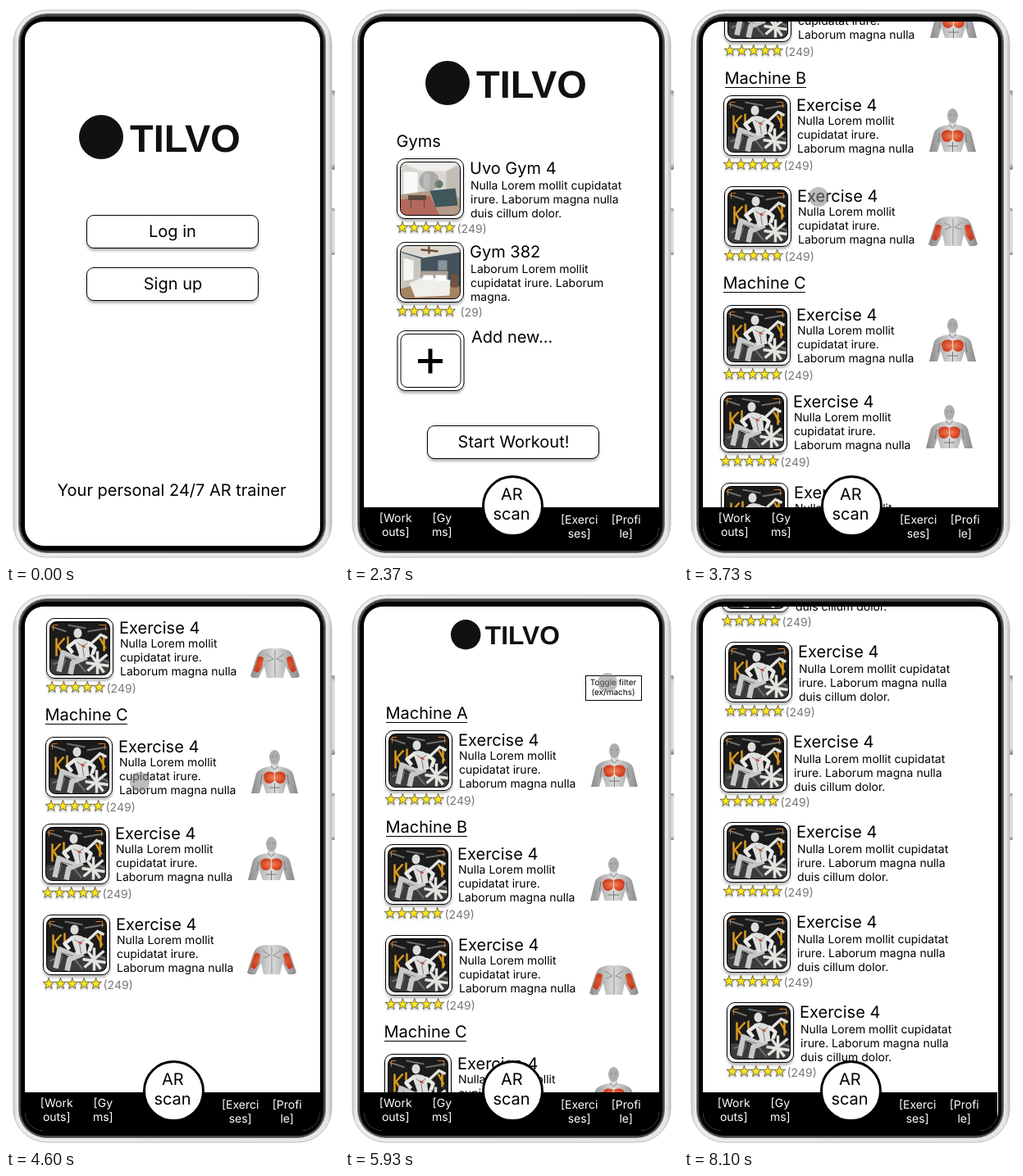
An HTML page that plays this animation: 406x680 px, repeating every 8.63 s.

```html
<!DOCTYPE html>
<html lang="en">
<head>
<meta charset="utf-8">
<title>Fitness app walkthrough</title>
<style>
  html, body { margin: 0; width: 100%; height: 100%; overflow: hidden; background: #fff; }
  svg { display: block; }
  text { font-family: Inter, "Open Sans", sans-serif; text-rendering: geometricPrecision; }
  .lg { font-size: 20px; }
  .md { font-size: 14px; }
  .sm { font-size: 10px; }
  .mid { text-anchor: middle; }
  .brand { font: bold 47px "Liberation Sans", Arial, sans-serif; }
  .box { fill: #fff; stroke: #000; }
  .shade { filter: drop-shadow(0 3px 1.5px rgba(0, 0, 0, .28)); }
  .stars { fill: #ffe81a; stroke: #222; stroke-width: .6; filter: drop-shadow(0 2px 1px rgba(0, 0, 0, .25)); }
</style>
</head>
<body>
<svg id="stage" width="406" height="680" viewBox="0 0 406 680">
  <defs>
    <clipPath id="screenClip"><rect x="23" y="19" width="360" height="640" rx="23"/></clipPath>
    <clipPath id="photoClip"><rect width="73" height="65" rx="8"/></clipPath>
    <linearGradient id="body" x2="1">
      <stop offset="0" stop-color="#c9c9c9"/><stop offset=".012" stop-color="#ececec"/>
      <stop offset=".988" stop-color="#e6e6e6"/><stop offset="1" stop-color="#bdbdbd"/>
    </linearGradient>
    <linearGradient id="key" x2="0" y2="1">
      <stop offset="0" stop-color="#8a8a8a"/><stop offset=".08" stop-color="#dedede"/>
      <stop offset=".92" stop-color="#dedede"/><stop offset="1" stop-color="#777"/>
    </linearGradient>
    <linearGradient id="skin" x2="1">
      <stop offset="0" stop-color="#8a8a8a"/><stop offset=".5" stop-color="#dcdcdc"/><stop offset="1" stop-color="#8a8a8a"/>
    </linearGradient>
    <radialGradient id="flesh">
      <stop offset="0" stop-color="#f58a5c"/><stop offset="1" stop-color="#cf3d1e"/>
    </radialGradient>

    <g id="machine">
      <rect width="73" height="65" fill="#1b1b1c"/>
      <path d="M0 46H73V65H0Z" fill="#3d3c3c"/>
      <path d="M2 6L20 12M22 4L44 8M46 12L70 8M4 52L14 48M34 50L44 62M64 46L72 50" stroke="#6d6d6b" stroke-width="2"/>
      <path d="M8 20V42M9 30L18 20M10 30L17 41M22 18V30M61 20L68 33M66 16V36" stroke="#d99a1c" stroke-width="2.5" fill="none"/>
      <path d="M60 4H68V11M4 11V4H10" stroke="#d9791c" fill="none"/>
      <path d="M46 60L70 40M50 40L66 62M58 36V64M44 50L72 54M47 30L62 16L70 20" stroke="#e2e2de" stroke-width="3.5" fill="none"/>
      <path d="M42 40L34 46L16 38L11 61M45 43L28 50L25 64" stroke="#c6c8c7" stroke-width="6.5" fill="none" stroke-linejoin="round"/>
      <path d="M29 22Q38 18 47 24L49 43L37 45Z" fill="#dededd"/>
      <path d="M31 24L22 31L28 38M46 25L55 32L52 40" stroke="#e9e9e8" stroke-width="4.5" fill="none" stroke-linejoin="round"/>
      <path d="M34 26L40 30L46 26M40 30L42 43M18 42L32 46M20 44L15 58" stroke="#777" fill="none"/>
      <ellipse cx="34" cy="14" rx="5" ry="6" fill="#dcdcda"/>
      <path d="M39 29L43 31" stroke="#d0483a" stroke-width="2"/>
    </g>
    <g id="lounge">
      <rect width="73" height="65" fill="#d9d6d1"/>
      <path d="M0 0H73L56 11H24Z" fill="#efeeeb"/>
      <path d="M4 12H21V39H4ZM28 14H36V33H28Z" fill="#f8faf9"/>
      <path d="M56 11L73 4V46L56 36Z" fill="#c2bdb5"/>
      <path d="M0 40L35 35L73 44V65H0Z" fill="#b39c88"/>
      <path d="M0 46L36 41L48 65H0Z" fill="#b3685c"/>
      <path d="M36 35L67 32L70 53L43 55Z" fill="#3f565b"/>
      <path d="M10 41H31V46H10ZM13 46V56M29 46V55" fill="#5c4941" stroke="#5c4941"/>
      <circle cx="47" cy="27" r="5" fill="#667b63"/>
    </g>
    <g id="bedroom">
      <rect width="73" height="65" fill="#43525d"/>
      <path d="M0 0H73V8L28 15L0 7Z" fill="#ddd9d1"/>
      <path d="M0 8L25 16V47L0 55Z" fill="#c8c6bf"/>
      <path d="M4 15L16 18V41L4 43Z" fill="#f6f6f1"/>
      <path d="M25 5L46 7M35 1V10" stroke="#704b3b" stroke-width="2.5"/>
      <path d="M46 18H57V30H46Z" fill="#8b9698"/>
      <path d="M0 53L24 46L73 50V65H0Z" fill="#a38262"/>
      <path d="M25 31H58V44H25Z" fill="#aaa296"/>
      <path d="M11 46L29 38L61 42L60 61L18 63Z" fill="#f0eeea"/>
      <path d="M28 36H40V42H28ZM43 36H56V43H43Z" fill="#fff"/>
      <path d="M62 35H70V51H62Z" fill="#765340"/>
    </g>

    <g id="chest">
      <path d="M24 13V20Q9 22 6 29L0 53H10L14 40L18 53H39L43 40L47 53H57L51 29Q48 22 33 20V13Z" fill="url(#skin)"/>
      <ellipse cx="28.5" cy="9" rx="6.5" ry="9" fill="#adadad"/>
      <path d="M25 8H27M30 8H32M24 20L28.5 24L33 20M28.5 41V53M22 46H35M13 30L11 42M44 30L46 42" stroke="#777" fill="none"/>
      <path d="M28 28Q19 24 15 31Q15 41 22 41Q27 40 28 37ZM29 28Q38 24 42 31Q42 41 35 41Q30 40 29 37Z" fill="url(#flesh)"/>
    </g>
    <g id="triceps">
      <path d="M23 1H37Q49 2 52 10L60 35L57 37H50L43 23L40 37H20L17 23L10 37H3L0 35L8 10Q11 2 23 1Z" fill="url(#skin)"/>
      <path d="M9 12Q12 9 16 13L14 24L9 31L4 28ZM51 12Q48 9 44 13L46 24L51 31L56 28Z" fill="url(#flesh)"/>
      <path d="M30 3V36M19 8L28 14L20 17M41 8L32 14L40 17" stroke="#8b8b8b" fill="none"/>
    </g>
  </defs>

  <rect width="406" height="680" fill="#fff"/>
  <rect x="396" y="103" width="5" height="97" rx="2" fill="url(#key)"/>
  <rect x="396" y="247" width="5" height="57" rx="2" fill="url(#key)"/>
  <rect x="9" y="5" width="388" height="668" rx="41" fill="url(#body)" stroke="#bcbcbc"/>
  <rect x="15" y="9" width="375" height="659" rx="35" fill="#777"/>
  <rect x="16" y="10" width="373" height="657" rx="34" fill="#444"/>
  <rect x="18" y="13" width="369" height="652" rx="31" fill="#000"/>
  <g clip-path="url(#screenClip)">
    <rect x="23" y="19" width="360" height="640" fill="#fff"/>
    <g id="login"></g>
    <g id="home"></g>
    <g id="machines"></g>
    <g id="muscles"></g>
    <g id="nav"></g>
  </g>
  <circle id="cursor" r="12" fill="#858585" fill-opacity=".55"/>
</svg>
<script>
const el = id => document.getElementById(id);
const text = (x, y, s, cls = 'lg', extra = '') => `<text x="${x}" y="${y}" class="${cls}" ${extra}>${s}</text>`;
const mid = (x, y, s, cls = 'lg', extra = '') => text(x, y, s, cls + ' mid', extra);
const lines = (x, y, list) => list.map((s, i) => text(x, y + 17 * i, s, 'md')).join('');
const heading = (x, y, s, width = 99) => text(x - .5, y + 7, s) +
  `<path d="M${x} ${y + 11.5}h${width}" stroke="#000"/>`;
const image = (id, x, y) => `<use href="#${id}" x="${x}" y="${y}"/>`;

const starPath = Array.from({ length: 10 }, (_, i) => {
  const r = i % 2 ? 2.8 : 7.3, a = i * Math.PI / 5;
  return (r * Math.sin(a)).toFixed(2) + ' ' + (-r * Math.cos(a)).toFixed(2);
}).join('L');

const logo = (x, y, k = 1) => `<g transform="translate(${x} ${y}) scale(${k})">
  <circle cx="27" cy="33" r="27" fill="#111"/>
  <text x="62" y="51" class="brand" fill="#111">TILVO</text></g>`;

const button = (x, y, s, tx) =>
  `<rect x="${x + .5}" y="${y + .5}" width="209" height="40" rx="8.5" class="box shade"/>` + mid(tx, y + 27, s);

const thumb = (x, y, photo) => `<g transform="translate(${x} ${y})">
  <rect x=".5" y=".5" width="81" height="73" rx="9.5" class="box shade"/>
  ${photo ? `<g transform="translate(4.5 4.5)" clip-path="url(#photoClip)"><use href="#${photo}"/></g>` : ''}
  <rect x="4.5" y="4.5" width="73" height="65" rx="8" fill="none" stroke="#000"/></g>`;

const stars = (x, y) => '<g class="stars">' + [0, 1, 2, 3, 4].map(i =>
  `<path d="M${starPath}Z" transform="translate(${x + 7 + 14.4 * i} ${y})"/>`).join('') + '</g>';

// y is the middle of the title line
function card(x, y, title, body, photo, gap = 26, count = '(249)', countX = 73.5) {
  return thumb(x, y - 12, photo) + text(x + 89, y + 7, title) + lines(x + 90, y + gap, body) +
    stars(x, y + 72.5) + text(x + countX, y + 79, count, 'md', 'fill="#777"');
}

const longBody = ['Nulla Lorem mollit cupidatat', 'irure. Laborum magna nulla', 'duis cillum dolor.'];
const shortBody = ['Nulla Lorem mollit', 'cupidatat irure.', 'Laborum magna nulla'];

const byMachine = (x, y, part) => card(x, y, 'Exercise 4', shortBody, 'machine', 24) +
  (part === 'chest' ? image(part, x + 251, y + 4) : image(part, x + 249, y + 24));
const byMuscle = (x, y) => card(x, y, 'Exercise 4', longBody, 'machine');

const listTop = logo(129, 31, .675) +
  '<rect x="293.5" y="103.5" width="68" height="30" class="box"/>' +
  mid(327, 115, 'Toggle filter', 'sm') + mid(327, 127, '(ex/machs)', 'sm');

el('login').innerHTML = logo(89, 127) + button(98, 255, 'Log in', 203) +
  button(98, 319, 'Sign up', 203.5) + mid(202, 598, 'Your personal 24/7 AR trainer');

el('home').innerHTML = logo(98, 61) + text(62.5, 172, 'Gyms') +
  card(63, 198, 'Uvo Gym 4', longBody, 'lounge') +
  card(63, 300, 'Gym 382', ['Laborum Lorem mollit', 'cupidatat irure. Laborum', 'magna.'], 'bedroom', 26, '(29)', 77.5) +
  thumb(63.5, 396) + '<path d="M89 433.5H119M104 418.5V448.5" stroke="#000" stroke-width="5"/>' +
  text(154, 411, 'Add new...') + button(100, 512, 'Start Workout!', 205.5);

el('machines').innerHTML = listTop +
  heading(50, 149, 'Machine A') + byMachine(49, 182, 'chest') +
  heading(50, 288, 'Machine B') + byMachine(48, 321, 'chest') + byMachine(49, 432, 'triceps') +
  heading(48, 538, 'Machine C', 100) + byMachine(48, 577, 'chest') +
  byMachine(44, 683, 'chest') + byMachine(45, 794, 'triceps');

el('muscles').innerHTML = listTop +
  heading(50, 149, 'Chest', 56) + image('chest', 136, 111) + byMuscle(49, 182) +
  heading(48, 318, 'Triceps', 69) + image('triceps', 135, 294) +
  [46, 50, 44, 48, 48, 52].map((x, i) => byMuscle(x, 351 + 110 * i)).join('');

const tab = (x, y, a, b) => mid(x, y, a, 'md', 'fill="#fff"') + mid(x, y + 17, b, 'md', 'fill="#fff"');
el('nav').innerHTML = '<rect x="23" y="612" width="360" height="48"/>' +
  tab(61.7, 630, '[Work', 'outs]') + tab(118.3, 630, '[Gy', 'ms]') +
  tab(285.7, 632, '[Exerci', 'ses]') + tab(342.7, 632, '[Profi', 'le]') +
  '<circle cx="204.5" cy="610.5" r="36" fill="#fff" stroke="#000" stroke-width="3"/>' +
  mid(203.3, 603, 'AR') + mid(203, 627, 'scan');

const LOOP = 8630;
const screens = [[0, 'login'], [1230, 'home'], [2730, 'machines'], [6030, 'muscles']];
const scrolls = [[0, 0], [3730, 200], [3900, 387], [4870, 187], [4900, 0], [7000, 200], [7100, 387]];
// start, end, from x, y, to x, y
const moves = [
  [400, 1033, 410, 310, 219, 252],
  [1970, 2400, 219, 252, 101, 213],
  [3400, 3700, 101, 213, 164, 233],
  [4600, 4601, 163, 233, 163, 233],
  [5200, 5930, 163, 233, 320, 112],
  [6330, 6700, 320, 112, 223, 237],
  [7500, 7501, 226, 235, 226, 235],
  [7700, 8100, 226, 235, 323, 662]
];
const latest = (list, t) => list.filter(e => e[0] <= t).pop();
const ease = p => p * p * (3 - 2 * p);

function draw(t) {
  const screen = latest(screens, t)[1], scroll = latest(scrolls, t)[1];
  for (const [, id] of screens) {
    el(id).style.display = id === screen ? '' : 'none';
    el(id).setAttribute('transform', `translate(0 ${-scroll})`);
  }
  el('nav').style.display = screen === 'login' ? 'none' : '';
  el('nav').setAttribute('transform', `translate(${screen === 'muscles' ? -1 : 0} 0)`);

  const move = t < 8100 && latest(moves, t);
  el('cursor').style.display = move ? '' : 'none';
  if (move) {
    const [start, end, x0, y0, x1, y1] = move;
    const p = ease(Math.min(1, (t - start) / (end - start)));
    el('cursor').setAttribute('cx', x0 + (x1 - x0) * p);
    el('cursor').setAttribute('cy', y0 + (y1 - y0) * p);
  }
}

const began = performance.now();
function tick() {
  draw((performance.now() - began) % LOOP);
  requestAnimationFrame(tick);
}
tick();
</script>
</body>
</html>
```
